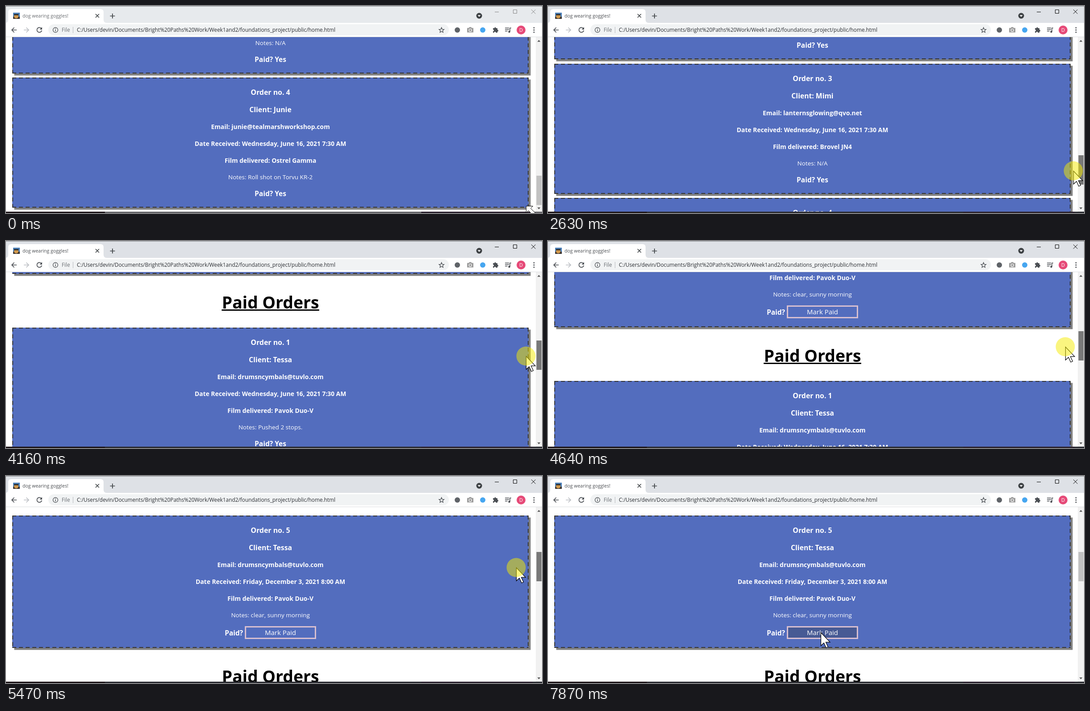
Animation, 1203 px wide and 466 px high, one loop 8 s. Source, as an HTML page:

```html
<!DOCTYPE html>
<html lang="en">
<head>
<meta charset="utf-8">
<title>Paid orders</title>
<style>
  html, body { margin: 0; width: 100%; height: 100%; overflow: hidden; background: #fff; }
  body { font-family: "Open Sans", "Noto Sans", sans-serif; position: relative; }
  #view { position: absolute; left: 0; top: 70px; width: 1189px; height: 393px; overflow: hidden; }
  #page { position: absolute; left: 0; top: -70px; width: 1189px; }
  #page div { position: absolute; box-sizing: border-box; white-space: nowrap; }
  #page .card { left: 14px; width: 1159px; background: #536dbe; color: #fff; box-shadow: 4.5px 4.5px #808080; }
  #page .line { left: 0; width: 1159px; height: 20px; line-height: 20px; text-align: center; font-weight: 700; }
  #page .button { left: 522px; top: 249px; width: 160px; height: 29px; line-height: 23px;
    border: 3px solid #d8bfd0; text-align: center; font-size: 15px; }
  #page .title { left: 0; width: 1187px; top: 425px; line-height: 52px; text-align: center;
    font-size: 37.4px; font-weight: 700; color: #000; }
  #page .rule { left: 484px; top: 467px; width: 219px; height: 3px; background: #000; }
  svg { position: absolute; left: 0; top: 0; display: block; }
  .border { fill: none; stroke: #333; stroke-width: 2; stroke-dasharray: 9 6; }
</style>
</head>
<body>
<div id="view"><div id="page">
  <div class="title">Paid Orders</div>
  <div class="rule"></div>
</div></div>

<svg width="1203" height="466" viewBox="0 0 1203 466">
  <!-- tab strip -->
  <rect id="strip" width="1203" height="38"/>
  <rect width="1203" height="1" fill="#85888c"/>
  <path d="M-2 38q7 0 7-7V14q0-7 7-7H212q7 0 7 7v17q0 7 7 7z" fill="#fff"/>
  <g>
    <rect x="16" y="15" width="15" height="14" fill="#4a7fb8"/>
    <rect x="16" y="24" width="15" height="5" fill="#3b3430"/>
    <circle cx="23" cy="23" r="5" fill="#d39a4c"/>
    <rect x="18" y="18" width="10" height="3" fill="#33302e"/>
  </g>
  <text id="tab" x="37" y="26" font-size="10.5">dog wearing goggles!</text>
  <path d="M201 18l8 8m0-8l-8 8" stroke="#3c4043" stroke-width="1.6"/>
  <path d="M233.500 22.500h11m-5.500-5.500v11" stroke="#3c4043" stroke-width="1.7"/>
  <circle cx="1062" cy="22" r="6.500" fill="#3c4043"/>
  <path d="M1058.500 20.500h7l-3.500 4z" fill="#fff"/>
  <path id="controls" d="M1097 13.500h9M1138.500 8.500h8v8h-8zM1179 8l9.500 9.500m0-9.500l-9.500 9.500" fill="none"/>

  <!-- toolbar -->
  <rect y="38" width="1203" height="32" fill="#fff"/>
  <rect y="69" width="1203" height="1" fill="#dcdee1"/>
  <rect x="95" y="41" width="899" height="25" rx="12.500" fill="#f1f3f4"/>
  <g fill="none" stroke="#4b4f54" stroke-width="1.700">
    <path d="M24 54H13m5.500-5.500L13 54l5.500 5.500"/>
    <path d="M40 54h11m-5.500-5.500L51 54l-5.500 5.500" stroke="#bcbfc3"/>
    <path d="M79.300 50.500a5.500 5.500 0 1 0 1 4.500"/>
    <path d="M81 47.500v5.500h-5.500z" fill="#4b4f54" stroke="none"/>
    <circle cx="111" cy="54" r="5.500" stroke-width="1.300"/>
    <path d="M111 53v4m0-6.500v1.500" stroke-width="1.400"/>
    <path id="star" stroke-width="1.300"/>
  </g>
  <text x="125" y="58" font-size="11.8" fill="#6a6e73">File</text>
  <rect x="150" y="47" width="1" height="14" fill="#b5b8bc"/>
  <text x="159" y="58" font-size="11.87" fill="#2b2e33">C:/Users/devin/Documents/Bright%20Paths%20Work/Week1and2/foundations_project/public/home.html</text>

  <!-- extensions -->
  <circle cx="1013" cy="54" r="6" fill="#5f6368"/>
  <path d="M1035 49.500h3.500l1.500-2h4l1.500 2h3.500v10h-14z" fill="#9b9b9b"/>
  <circle cx="1042" cy="54.500" r="3" fill="#9b9b9b" stroke="#fff" stroke-width="1.200"/>
  <circle cx="1070" cy="54" r="6" fill="#46a6f0"/>
  <path d="M1093 50h3a2 2 0 1 1 4 0h3v3.500a2 2 0 1 1 0 4V60h-3.500a2 2 0 0 0-4 0H1093v-3a2 2 0 0 0 0-4z" fill="#4b4f54"/>
  <path d="M1120 49.500h9m-9 3.500h9m-9 3.500h5.500m5.500 1.500v-8.500h3" fill="none" stroke="#4b4f54" stroke-width="1.600"/>
  <circle cx="1129.500" cy="58" r="2.200" fill="#4b4f54"/>
  <circle cx="1156" cy="54" r="10" fill="#e64a78"/>
  <text x="1156" y="58" font-size="11" fill="#fff" text-anchor="middle">D</text>
  <path d="M1185 49v.01m0 5v.01m0 5v.01" stroke="#4b4f54" stroke-width="3" stroke-linecap="round"/>

  <!-- scrollbar -->
  <rect x="1189" y="70" width="14" height="393" fill="#f1f1f1"/>
  <path d="M1192.500 80.500h7l-3.500-4zM1192.500 453.500h7l-3.500 4z" fill="#505050"/>
  <rect id="thumb" x="1190.500" width="11.500" height="66"/>

  <!-- desktop edge -->
  <rect id="edge" y="463" width="1203" height="3"/>
  <rect y="463" width="222" height="3" fill="#1f171b"/>
  <rect x="932" y="463" width="250" height="3" fill="#2d2430"/>

  <!-- pointer -->
  <path id="sizer" d="M1167.500 450.500h15l-5 5 14 14-5 5-14-14-5 5z" fill="#fff" stroke="#000"/>
  <path id="arrow" d="M.5.500v29.500l6.700-6.300 5 11 4.300-2-5-10.500h9.500z" fill="#fff" stroke="#000" stroke-width="1.200"/>
  <circle id="halo" r="21.500" fill="#f5eb00" fill-opacity=".5"/>
</svg>

<script>
const $ = id => document.getElementById(id);
const page = $('page');
const LOOP = 8000, THUMB_TOP = 171, RATIO = 5.95;
const PRESS = 1010, RELEASE = 6260;

// order number, top, client, email, date, film, notes
const WED = 'Wednesday, June 16, 2021 7:30 AM';
const orders = [
  [5, 89, 'Tessa', 'drumsncymbals@tuvlo.com', 'Friday, December 3, 2021 8:00 AM', 'Pavok Duo-V', 'clear, sunny morning'],
  [1, 508, 'Tessa', 'drumsncymbals@tuvlo.com', WED, 'Pavok Duo-V', 'Pushed 2 stops.'],
  [2, 811, 'Wendel', 'redfoxbythepond@fernbox.com', WED, 'Hulven D-Vox', 'Film was expired 4 years'],
  [3, 1114, 'Mimi', 'lanternsglowing@qvo.net', WED, 'Brovel JN4', 'N/A'],
  [4, 1416, 'Junie', 'junie@tealmarshworkshop.com', WED, 'Ostrel Gamma', 'Roll shot on Torvu KR-2']
];

function box(parent, cls, text = '') {
  const el = document.createElement('div');
  el.className = cls;
  el.textContent = text;
  parent.append(el);
  return el;
}

function line(card, text, mid, size, weight = 700) {
  const el = box(card, 'line', text);
  el.style.top = mid - 10 + 'px';
  el.style.fontSize = size + 'px';
  el.style.fontWeight = weight;
  return el;
}

let button;
for (const [no, top, client, email, date, film, notes] of orders) {
  const open = no === 5, height = open ? 298 : 293;
  const card = box(page, 'card');
  card.style.top = top + 'px';
  card.style.height = height + 'px';
  card.innerHTML = `<svg width="1159" height="${height}"><path class="border"
    d="M0 1H1159M0 ${height - 1}H1159M1 0V${height}M1158 0V${height}"/></svg>`;
  line(card, 'Order no. ' + no, 33, 15.9);
  line(card, 'Client: ' + client, 72, 15.7);
  line(card, 'Email: ' + email, 111, 13.9);
  line(card, 'Date Received: ' + date, 149, 13.9);
  line(card, 'Film delivered: ' + film, 187, 13.9);
  line(card, 'Notes: ' + notes, 224, 13.5, 400);
  const paid = line(card, open ? 'Paid?' : 'Paid? Yes', open ? 264 : 261, 15.5);
  if (open) {
    paid.style.left = '-82px';
    button = box(card, 'button', 'Mark Paid');
  }
}

$('star').setAttribute('d', 'M' + Array.from({ length: 10 }, (_, i) => {
  const r = i % 2 ? 2.7 : 6, a = i * Math.PI / 5 - Math.PI / 2;
  return (977.5 + r * Math.cos(a)).toFixed(1) + ' ' + (54.5 + r * Math.sin(a)).toFixed(1);
}).join('L') + 'z');

const bursts = [
  [70, 460, 6], [1610, 1610, 1], [1940, 2700, 12], [2770, 3540, 12], [3600, 4370, 12],
  [4440, 5180, 12], [5260, 5470, 4], [6260, 7020, 12], [7070, 7870, 13]
];

function hold(t) {
  let held = 0;
  for (const [a, b, n] of bursts) {
    if (t < a) break;
    const step = (b - a) / (n - 1) || 1;
    held = a + Math.min(n - 1, Math.floor((t - a) / step + 0.05)) * step;
  }
  return held;
}

// smooth curve through [time, value] keys without overshoot
function curve(keys) {
  const slope = i => (keys[i + 1][1] - keys[i][1]) / (keys[i + 1][0] - keys[i][0]);
  const tangent = i => {
    if (i === 0 || i === keys.length - 1) return 0;
    const a = slope(i - 1), b = slope(i);
    return a * b > 0 ? 2 * a * b / (a + b) : 0;
  };
  return t => {
    if (t <= keys[0][0]) return keys[0][1];
    const i = keys.findIndex((k, n) => n < keys.length - 1 && t < keys[n + 1][0]);
    if (i < 0) return keys[keys.length - 1][1];
    const [t0, v0] = keys[i], [t1, v1] = keys[i + 1];
    const d = t1 - t0, u = (t - t0) / d, w = 1 - u;
    return v0 * w * w * (1 + 2 * u) + v1 * u * u * (3 - 2 * u)
      + d * u * w * (w * tangent(i) - u * tangent(i + 1));
  };
}

const scrollAt = curve([[1870, 1255], [2630, 984], [3540, 622], [4160, 313], [5045, 106], [5470, 0]]);
const xAt = curve([[0, 1181], [460, 1197], [1610, 1198], [1870, 1198], [2630, 1179], [3540, 1170],
  [4160, 1167], [5045, 1154], [5470, 1145], [6200, 1145], [7020, 600], [7870, 612]]);
const riseAt = curve([[0, 465], [460, 417]]);
const leaveAt = curve([[6200, 207], [7020, 246], [7870, 352]]);

function draw(time) {
  const t = hold(time);
  const active = time >= PRESS, drag = active && time < RELEASE;
  const scroll = Math.round(scrollAt(t));
  const thumb = Math.round(THUMB_TOP + scroll / RATIO);
  const x = Math.round(xAt(t));
  const y = Math.round(t < 1610 ? riseAt(t) : time < RELEASE ? thumb + 35 : leaveAt(t));
  const sizing = time < 140;
  const over = !drag && x > 1190 && y < 448;

  page.style.transform = `translateY(${-scroll}px)`;
  button.style.background = time > RELEASE && y >= 338 ? '#475a94' : 'none';
  $('strip').setAttribute('fill', active ? '#dee1e6' : '#e7eaed');
  $('tab').setAttribute('fill', active ? '#4a4d51' : '#686b6f');
  $('controls').setAttribute('stroke', active ? '#000' : '#858585');
  $('edge').setAttribute('fill', active ? '#2c2d33' : '#66666a');
  $('thumb').setAttribute('y', thumb);
  $('thumb').setAttribute('fill', drag ? '#787878' : over ? '#a8a8a8' : '#c1c1c1');
  $('sizer').style.display = sizing ? '' : 'none';
  $('sizer').setAttribute('transform', `translate(${x - 1181} ${y - 465})`);
  $('arrow').style.display = sizing ? 'none' : '';
  $('halo').style.display = drag ? '' : 'none';
  for (const id of ['arrow', 'halo']) $(id).setAttribute('transform', `translate(${x} ${y})`);
}

const start = performance.now();
function tick() {
  draw((performance.now() - start) % LOOP);
  requestAnimationFrame(tick);
}
tick();
</script>
</body>
</html>
```
